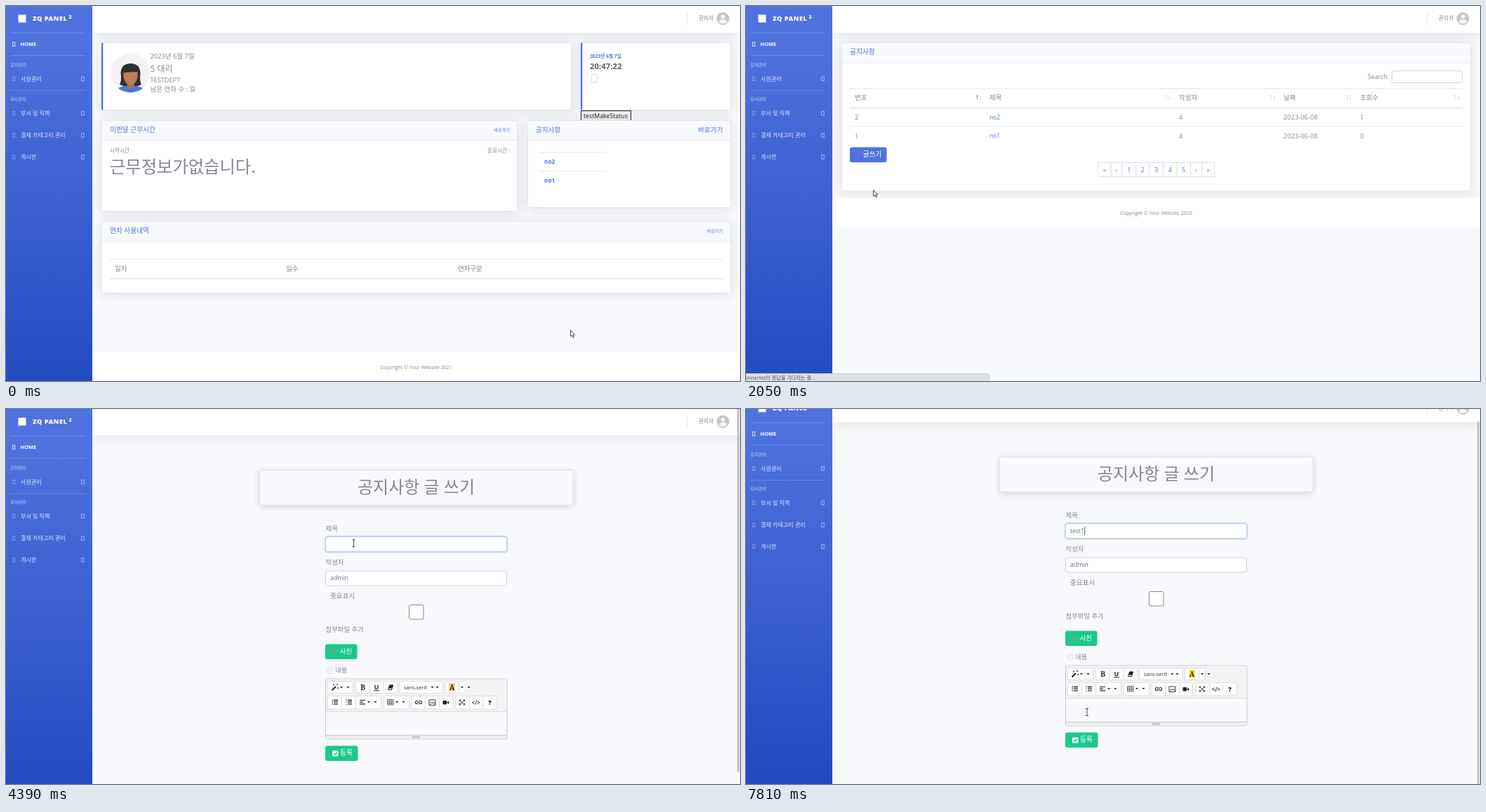
Recreate the animation shown at these times as an HTML page. Size 1046 px wide and 535 px high, loop 8000 ms.

```html
<!DOCTYPE html>
<html lang="ko">
<head>
<meta charset="utf-8">
<title>공지사항</title>
<style>
html, body { margin: 0; width: 100%; height: 100%; overflow: hidden; background: #f8f9fc; }
svg { display: block; width: 1046px; height: 535px; }
text { font-family: "Open Sans", "Noto Sans CJK KR", "Noto Sans CJK", sans-serif; white-space: pre; }
</style>
</head>
<body>
<svg id="stage" viewBox="0 0 1046 535"></svg>
<script>
const LOOP = 8000;
const GREY = '#858796', BLUE = '#4e73df', LINE = '#e3e6f0', PALE = '#f8f9fc', GREEN = '#1cc88a';

// y is the middle of the capitals
const text = (x, y, s, size = 9.4, fill = GREY, weight = 400, anchor = 'start', extra = '') =>
  `<text x="${x}" y="${y + size * 0.36}" font-size="${size}" fill="${fill}" font-weight="${weight}" text-anchor="${anchor}" ${extra}>${s}</text>`;
const rect = (x, y, x2, y2, fill, r = 0, extra = '') =>
  `<rect x="${x}" y="${y}" width="${x2 - x}" height="${y2 - y}" rx="${r}" fill="${fill}" ${extra}/>`;
const frame = (x, y, x2, y2, fill, stroke, r = 3, extra = '') =>
  rect(x + .5, y + .5, x2 - .5, y2 - .5, fill, r, `stroke="${stroke}" ${extra}`);
const path = (d, stroke = '#333', width = 1, fill = 'none', extra = '') =>
  `<path d="${d}" stroke="${stroke}" stroke-width="${width}" fill="${fill}" ${extra}/>`;
const hline = (x, x2, y, color = LINE, h = 1) => rect(x, y, x2, y + h, color);
const group = (id, body, extra = '') => `<g id="${id}" ${extra}>${body}</g>`;
const shadow = 'filter="url(#soft)"';
const card = (x, y, x2, y2, headY) =>
  frame(x, y, x2, y2, '#fff', LINE, 3, shadow) +
  (headY ? rect(x + 1, y + 1, x2 - 1, headY, PALE, 2) + hline(x + 1, x2 - 1, headY) : '');
const accentCard = (x, y, x2, y2) => card(x, y, x2, y2) +
  path(`M${x + 3} ${y}H${x + 2.3}V${y2}H${x + 3}Q${x} ${y2} ${x} ${y2 - 3}V${y + 3}Q${x} ${y} ${x + 3} ${y}`, 'none', 0, BLUE);
const glyphBox = (x, y, w, h, color, width = .8, extra = '') =>
  `<rect x="${x}" y="${y}" width="${w}" height="${h}" fill="none" stroke="${color}" stroke-width="${width}" ${extra}/>`;
const caretDown = (x, y) => path(`M${x - 2} ${y - 1}h4l-2 2.3z`, 'none', 0, '#222');

function sidebar() {
  const items = [['사원관리', 104], ['부서 및 직책', 153], ['결재 카테고리 관리', 184.5], ['게시판', 215.5]];
  const soft = 'rgba(255,255,255,.8)', faint = 'rgba(255,255,255,.45)';
  return rect(0, 0, 123, 554, 'url(#side)') +
    text(38, 18, 'ZQ PANEL', 9.2, '#fff', 800, 'start', 'letter-spacing=".5"') +
    text(89.5, 15.5, '2', 7, '#fff', 800) +
    [38, 70, 120].map(y => hline(6, 113, y, 'rgba(255,255,255,.17)')).join('') +
    text(20.5, 54.5, 'HOME', 7.45, '#fff', 700) +
    text(6, 83.5, '유저관리', 6.2, faint, 700) + text(6, 133, '회사관리', 6.2, faint, 700) +
    items.map(([s, y]) => text(21, y, s, 8.1, soft)).join('') +
    group('sideIcons', rect(17.5, 12.5, 28.5, 23.5, '#fff') + glyphBox(9.4, 51.8, 3.4, 5.4, '#fff') +
      items.map(([, y], i) => glyphBox(9.4, y - 2.8, 3.4, 5.4, 'rgba(255,255,255,.4)', .8, i === 3 ? 'id="boardIcon"' : '') +
        glyphBox(107.6, y - 2.8, 3.6, 5.6, 'rgba(255,255,255,.6)')).join(''));
}

function menu() {
  const lines = y => path(`M20 ${y - 2.5}h7M20 ${y}h7M20 ${y + 2.5}h4m1 0h3m-1.5-1.5v3`, '#3a3b45', .8);
  return rect(6, 232, 113.5, 281.5, '#fff', 3) + rect(10.5, 236, 109, 257, '#eaecf4', 3) +
    lines(246.5) + text(34, 245.5, '공지사항', 8.1, '#3a3b45') +
    lines(267) + text(34, 266.5, 'QnA', 7.45, '#3a3b45');
}

function topbar() {
  return rect(123, 0, 1046, 38, '#fff', 0, shadow) + rect(970.5, 8, 971.5, 28, LINE) +
    text(987, 17, '관리자', 7.7) +
    `<circle cx="1021.7" cy="18" r="9" fill="#c6c6c9"/><circle cx="1021.7" cy="15.2" r="3" fill="#f4f4f5"/>` +
    path('M1016 23.5q0-4.5 5.7-4.5t5.7 4.5q-5.7 3.5-11.4 0', 'none', 0, '#f4f4f5');
}

function portrait() {
  return `<g clip-path="url(#round)"><circle cx="177.5" cy="95.5" r="28" fill="#f2f3f4"/>` +
    path('M162 112Q165 106 163.500 96Q164 82 177.500 82T191.500 96Q190 106 193 112Q178 120 162 112', 'none', 0, '#2f2e33') +
    `<ellipse cx="177.5" cy="124" rx="23" ry="10.500" fill="${BLUE}"/>` +
    path('M172.500 106h10v9q-5 5-10 0z', 'none', 0, '#b0704f') +
    path('M167.500 95q10-1 20-1v8q-2 10-10 10t-10-10z', 'none', 0, '#be7c5c') + '</g>';
}

const footer = (y, y2, year) => rect(123, y, 1046, y2, '#fff') +
  text(584.5, (y + y2) / 2 + .6, 'Copyright © Your Website ' + year, 7.05, GREY, 400, 'middle');

function homePage() {
  return accentCard(136, 52, 806, 149) + portrait() +
    text(205.5, 72, '2023년 6월 7일') + text(205.5, 89.5, '5 대리', 12) +
    text(205.5, 105.5, 'TESTDEPT', 9.2) + text(205.5, 119, '남은 연차 수 : 일', 9.5) +
    accentCard(819, 52, 1033, 149) +
    text(832, 72, '2023년 6월 7일', 6.7, BLUE, 700) +
    text(832, 86, '', 11.4, '#5a5c69', 700, 'start', 'id="clock"') +
    glyphBox(834.5, 97.5, 8, 11, '#dddfeb', 1) +
    frame(819, 149, 891, 167, '#efefef', '#222', 0) + text(823, 157, 'testMakeStatus', 8.77, '#222') +
    card(136, 163, 729, 293, 191) + text(148, 176.5, '이번달 근무시간', 9.7, BLUE, 500) +
    text(718, 176.5, '바로가기', 6.2, BLUE, 400, 'end') +
    text(148, 206.5, '시작시간 :', 7.6) + text(718, 206.5, '종료시간 :', 7.6, GREY, 400, 'end') +
    text(148, 229, '근무정보가없습니다.', 24.3) +
    card(743, 163, 1033, 288, 191) + text(755, 176.5, '공지사항', 9.6, BLUE, 500) +
    text(1021.5, 176.5, '바로가기', 9.6, BLUE, 400, 'end') +
    hline(760, 856, 208.5) + hline(760, 856, 235.5) +
    text(767, 222, 'no2', 8.3, BLUE, 700) + text(767, 249, 'no1', 8.3, BLUE, 700) +
    card(136, 307, 1033, 410, 335.5) + text(148, 321, '연차 사용내역', 9.7, BLUE, 500) +
    text(1021.5, 321, '바로가기', 6.2, BLUE, 400, 'end') +
    hline(148, 1021.5, 361) + hline(148, 1021.5, 388.3, LINE, 1.6) +
    [['일자', 155], ['일수', 399], ['연차구분', 644]].map(([s, x]) => text(x, 374.5, s, 9.5, GREY, 500)).join('') +
    footer(493, 536, 2021);
}

function listPage() {
  const cols = [['번호', 155, 336], ['제목', 347, 605.5], ['작성자', 617, 754.5], ['날짜', 766, 863], ['조회수', 875, 1017]];
  const rows = [['2', 'no2', '4', '2023-06-08', '1'], ['1', 'no1', '4', '2023-06-08', '0']];
  const pages = [['«', 502, 520], ['‹', 520, 536], ['1', 536, 556], ['2', 556, 575], ['3', 575, 594.5],
    ['4', 594.5, 614], ['5', 614, 633.5], ['›', 633.5, 649.5], ['»', 649.5, 667.5]];
  const up = (x, c) => path(`M${x} 133.500v-6m-1.300 1.500l1.300-1.600l1.300 1.600`, c, .8);
  const down = (x, c) => path(`M${x} 127.500v6m-1.300-1.500l1.300 1.600l1.300-1.600`, c, .8);
  return card(136, 52, 1033, 264.5, 80.5) + text(148, 65.5, '공지사항', 9.7, BLUE, 500) +
    text(886, 100.5, 'Search:', 8.77) + frame(920, 92, 1021.5, 110, '#fff', '#d1d3e2', 2) +
    hline(148, 1021.5, 117.5) + hline(148, 1021.5, 144.6, LINE, 1.6) + hline(148, 1021.5, 171.3) +
    cols.map(([s, x, end], i) => text(x, 131, s, 9.5, GREY, 500) +
      up(end - 6.5, i ? '#d5d6dc' : GREY) + down(end - 1.8, '#d5d6dc')).join('') +
    rows.map((row, r) => row.map((s, i) =>
      text(cols[i][1], 158.7 + 26.5 * r, s, i === 1 ? 8.5 : 9.3, i === 1 ? BLUE : GREY)).join('')).join('') +
    rect(148, 201.5, 200.5, 223, BLUE, 3, 'id="writeButton"') +
    path('M158 215l1-2l4-4', '#8a6f79', 1) + text(166.5, 211.7, '글쓰기', 9.7, '#fff') +
    pages.map(([s, x, x2]) => rect(x, 223.3, x2, 243.5, '#fff', 0, 'stroke="#dddfeb"') +
      text((x + x2) / 2, 233.3, s, 9.2, s > '0' && s < '9' ? BLUE : GREY, 400, 'middle')).join('') +
    footer(273.5, 317, 2020);
}

// a run of joined buttons between the given edges
const cells = (row, ...edges) => edges.slice(1).map((x2, i) =>
  frame(edges[i], row ? 409 : 388, x2 + 1, row ? 428.5 : 406, '#fff', '#dcdee2', 1)).join('');
const carets = (row, ...xs) => xs.map(x => caretDown(x, row ? 418 : 397)).join('');

function bareTools() {
  return cells(0, 458, 490) + cells(0, 493, 510, 527, 544) + cells(0, 547, 605) + cells(0, 609, 626, 637) +
    cells(0, 640, 657, 674, 705) + cells(1, 458, 490) + cells(1, 493, 510, 527, 544) + cells(1, 547, 564, 581, 598) +
    text(553.5, 397, 'sans-serif', 7.3, '#333') + rect(615, 391, 621, 402, '#ffee1a') +
    carets(0, 482, 598, 638, 697.5) + carets(1, 482);
}

function fullTools() {
  const bars = (x, w) => w.map((n, i) => `M${x} ${415.5 + i * 2.7}h${n}`).join('');
  return cells(0, 458, 494) + cells(0, 498, 518, 538, 557) + cells(0, 560, 622) + cells(0, 625, 645, 654) +
    cells(1, 458, 478, 498, 534) + cells(1, 538, 574) + cells(1, 577, 597, 617, 636) + cells(1, 640, 660, 679, 699) +
    path('M464.500 401.500l5.500-5.500', '#222', 1.8) + path('M466 393.500h2m-1-1v2M471 393h2m-1-1v2M472 398h2m-1-1v2', '#222', .8) +
    text(508.5, 397, 'B', 10, '#222', 800, 'middle', 'style="font-family:\'Noto Serif\',serif"') +
    text(528, 396.5, 'U', 9, '#222', 700, 'middle') + path('M524 401.700h8', '#222', 1) +
    path('M544.500 400.500l2-6.500h5l-2 6.500zM545.500 398h5', '#222', 1) + path('M547 394h4.500l-1.300 4h-4.400z', '#222', .5, '#222') +
    text(567, 397, 'sans-serif', 7.3, '#333') + rect(631, 391, 640, 402.5, '#f9c987', 0, 'id="marker"') +
    text(635.5, 397, 'A', 10, '#222', 800, 'middle', 'style="font-family:\'Noto Serif\',serif"') +
    carets(0, 478, 487.5, 607.5, 614.5, 650, 659.5) +
    path(bars(467, [6, 6, 6]) + 'M464.500 415.500h1.500m-1.500 2.700h1.500m-1.500 2.700h1.500' + bars(487, [6, 6, 6]), '#222', 1.3) +
    path('M485 414v2.500m-1 1.500h1.500m-1.500 3.500h1.500', '#222', .8) +
    path(bars(504, [8, 5, 8]), '#222', 1.2) + carets(1, 517, 526.5, 557, 566.5) +
    path('M543.500 414.500h8.500v7.500h-8.500zM543.500 417h8.500m-8.500 2.500h8.500M546.300 414.500v7.500m2.900-7.500v7.500', '#444', .8) +
    path('M587.500 416.500h-2q-2 0-2 2t2 2h2M588.500 416.500h2q2 0 2 2t-2 2h-2M586 418.500h4', '#222', 1.1) +
    path('M603 415h9v7.500h-9zM604 421.500l2.500-3l1.500 1.500l1.500-2l2 3.500', '#222', .9) +
    rect(622.5, 416, 628, 421.5, '#222', 1) + path('M628 418.700l3-2.300v4.600z', 'none', 0, '#222') +
    path('M647 415.500l6 6m0-6l-6 6M646.500 417v-2h2m3 0h2v2m0 3v2h-2m-3 0h-2v-2', '#222', 1) +
    text(669.7, 418.7, '&lt;/&gt;', 8, '#222', 600, 'middle') + text(689.5, 418.7, '?', 9.5, '#222', 800, 'middle');
}

function formPage() {
  const field = y => frame(455, y, 714, y + 22, '#fff', '#d1d3e2', 3);
  return frame(361, 87, 808.5, 137.5, PALE, '#dfe1ea', 2, 'filter="url(#strong)"') +
    text(584.5, 111.5, '공지사항 글 쓰기', 24, GREY, 400, 'middle') +
    text(455.5, 171, '제목') + field(182) +
    group('focus', rect(454.5, 181.5, 714.5, 204.5, 'none', 4, 'stroke="#d3dcf7" stroke-width="2"') +
      frame(455, 182, 714, 204, '#fff', '#bac8f3', 3)) +
    text(462, 193, '', 8.77, '#6e707e', 400, 'start', 'id="typed"') + rect(0, 187, .9, 199, '#444', 0, 'id="caret"') +
    text(455.5, 219, '작성자') + field(230.5) + text(462, 241, 'admin', 8.77, '#6e707e') +
    text(462, 267, '중요표시', 9.6) + frame(574, 279, 595.5, 300.5, '#fff', '#8a8a8a', 2) +
    text(455.5, 315, '첨부파일 추가') +
    rect(455, 335.5, 500.5, 357, GREEN, 3) + path('M464.500 346.300h8m-4-4v8', '#8f9a80', 1.5) + text(475.5, 346, '사진', 9.6, '#fff') +
    `<circle cx="462" cy="373.300" r="4.200" fill="none" stroke="#cfd1dc" stroke-width=".8"/>` + path('M460 373.300h4', '#cfd1dc', .8) +
    text(469, 372.5, '내용') +
    frame(455, 384.5, 714.5, 471.5, PALE, '#c6c7ca', 2) + rect(456, 385.5, 713.5, 431, '#f3f3f4') + hline(456, 713.5, 431, '#dcdde0') +
    rect(456, 465, 713.5, 470.5, '#efeff0') + hline(456, 713.5, 465, '#c9cacd') + path('M579 467.500h11M579 469h11', '#a9a9a9', .8) +
    group('bareTools', bareTools()) + group('fullTools', fullTools()) +
    rect(455, 480.5, 501.5, 502, GREEN, 3) + rect(465, 487.5, 473.5, 495.5, '#fff', 1) +
    path('M466.700 491.500l2 2l3.500-4', GREEN, 1.3) + text(476, 490.7, '등록', 9.7, '#fff');
}

const $ = id => document.getElementById(id);
$('stage').innerHTML = `<defs>
  <linearGradient id="side" x1="0" y1="0" x2="0" y2="1"><stop offset=".1" stop-color="#4e73df"/><stop offset="1" stop-color="#224abe"/></linearGradient>
  <filter id="soft" x="-20%" y="-80%" width="140%" height="260%"><feDropShadow dx="0" dy="1.300" stdDeviation="7.500" flood-color="#3a3b45" flood-opacity=".15"/></filter>
  <filter id="strong" x="-20%" y="-80%" width="140%" height="260%"><feDropShadow dx="0" dy="2" stdDeviation="5" flood-color="#000" flood-opacity=".16"/></filter>
  <clipPath id="round"><circle cx="177.500" cy="95.500" r="28"/></clipPath>
  <clipPath id="menuClip"><rect id="menuWindow" x="0" y="232" width="123" height="50"/></clipPath></defs>` +
  rect(0, 0, 1046, 535, PALE) +
  group('scroller', topbar() + group('home', homePage()) + group('list', listPage()) + group('form', formPage()) +
    sidebar() + group('menu', menu(), 'clip-path="url(#menuClip)"')) +
  rect(1042, 0, 1045, 517.5, '#c1c1c4', 1, 'id="thumb"') +
  group('status', frame(-2, 524, 64, 538, '#dee1e6', '#c8cbd0', 2, 'id="statusBox"') +
    text(.8, 530.3, '', 6.4, '#45484d', 400, 'start', 'id="statusText"')) +
  group('pointer',
    path('M0 0V9L2.100 7.200L3.600 10.400L5 9.800L3.600 6.700H6.200Z', '#222', .8, '#fff', 'id="arrow"') +
    path('M-.800 1Q-.800 0 .200 0T1.200 1V5L4.800 6Q6 6.400 5.800 8L5 13H.500L-2.600 8.500Q-3 7 -1.800 7.200L-.800 8Z', '#222', .8, '#fff', 'id="hand"') +
    path('M-2-5H2M0-5V5M-2 5H2', '#333', .9, 'none', 'id="beam"'));

// start, end, steps, x, y, pointer on arrival
const moves = [
  [70, 130, 2, 499.5, 390.5, 'arrow'], [270, 750, 8, 40, 213, 'hand'], [1080, 1290, 4, 43.5, 245.5, 'hand'],
  [1900, 2280, 6, 292, 276, 'arrow'], [2340, 2610, 5, 167.5, 218.5, 'hand'], [3000, 3400, 6, 356, 180, 'arrow'],
  [3540, 3650, 3, 495.5, 191.5, 'beam'], [6000, 6140, 3, 615, 295, 'arrow'], [6210, 6280, 2, 612.5, 291.5, 'arrow'],
  [6680, 6740, 2, 605, 289, 'arrow'], [6880, 7150, 4, 534, 427, 'beam'], [7740, 7810, 2, 486, 432.5, 'beam']
];
const keyTimes = [4670, 4810, 5010, 5150, 5610];
const SITE = 'innerlist';
const WAIT = SITE + '의 응답을 기다리는 중...';
const statuses = [[1150, 1490, SITE + '/topic/items', 64], [1490, 2060, WAIT, 347],
  [2670, 2900, SITE + '/topic/write', 67], [2900, 3920, WAIT, 347]];

const within = (t, a, b) => t >= a && t < b;
const show = (id, on) => $(id).setAttribute('display', on ? 'inline' : 'none');
const ramp = (t, a, b) => Math.min(1, Math.max(0, (t - a) / (b - a)));
const easeOut = p => 1 - (1 - p) ** 2;

function pointerAt(t) {
  let x = 804.5, y = 462.5, shape = 'arrow';
  for (const [start, end, steps, toX, toY, toShape] of moves) {
    if (t < start) break;
    const step = Math.min(steps, 1 + Math.floor((t - start) * (steps - 1) / (end - start)));
    const p = easeOut(step / steps);
    x += (toX - x) * p;
    y += (toY - y) * p;
    shape = p > .97 || shape === toShape ? toShape : 'arrow';
  }
  return { x, y, shape };
}

function render(t) {
  const page = t < 1840 ? 'home' : t < 3200 ? 'list' : 'form';
  for (const id of ['home', 'list', 'form']) show(id, id === page);
  show('sideIcons', !within(t, 1840, 1960) && !within(t, 3200, 3540));
  $('boardIcon').setAttribute('stroke', within(t, 680, 1630) ? '#fff' : 'rgba(255,255,255,.4)');
  $('clock').textContent = '20:47:' + (t < 130 ? 22 : t < 1110 ? 23 : 24);
  show('menu', within(t, 900, 1840));
  $('menuWindow').setAttribute('height', 50 * easeOut(ramp(t, 880, 1100)));
  $('writeButton').setAttribute('fill', t >= 2540 ? '#2e59d9' : BLUE);

  show('bareTools', t < 3540);
  show('fullTools', t >= 3540);
  show('focus', t >= 3850);
  $('typed').textContent = 'test1'.slice(0, keyTimes.filter(k => t >= k).length);
  $('caret').setAttribute('x', 462 + $('typed').getComputedTextLength());
  show('caret', within(t, 3900, 4390) || within(t, 4670, 6110) || within(t, 6680, 7180) || t >= 7740);

  const scroll = 19 * easeOut(ramp(t, 7180, 7400));
  $('scroller').setAttribute('transform', `translate(0 ${-scroll})`);
  $('thumb').setAttribute('y', scroll * .95);
  show('thumb', page === 'form');
  $('marker').setAttribute('fill', t < 7180 ? '#f9c987' : '#fff03a');

  const status = statuses.find(([a, b]) => within(t, a, b));
  show('status', status);
  if (status) {
    $('statusText').textContent = status[2];
    $('statusText').setAttribute('font-size', status[2] === WAIT ? 7.2 : 6.4);
    $('statusBox').setAttribute('width', status[3] + 1);
  }

  const { x, y, shape } = pointerAt(t);
  $('pointer').setAttribute('transform', `translate(${x} ${y})`);
  for (const id of ['arrow', 'hand', 'beam']) show(id, id === shape);
}

const begin = performance.now();
function tick() {
  render((performance.now() - begin) % LOOP);
  requestAnimationFrame(tick);
}
tick();
</script>
</body>
</html>
```
